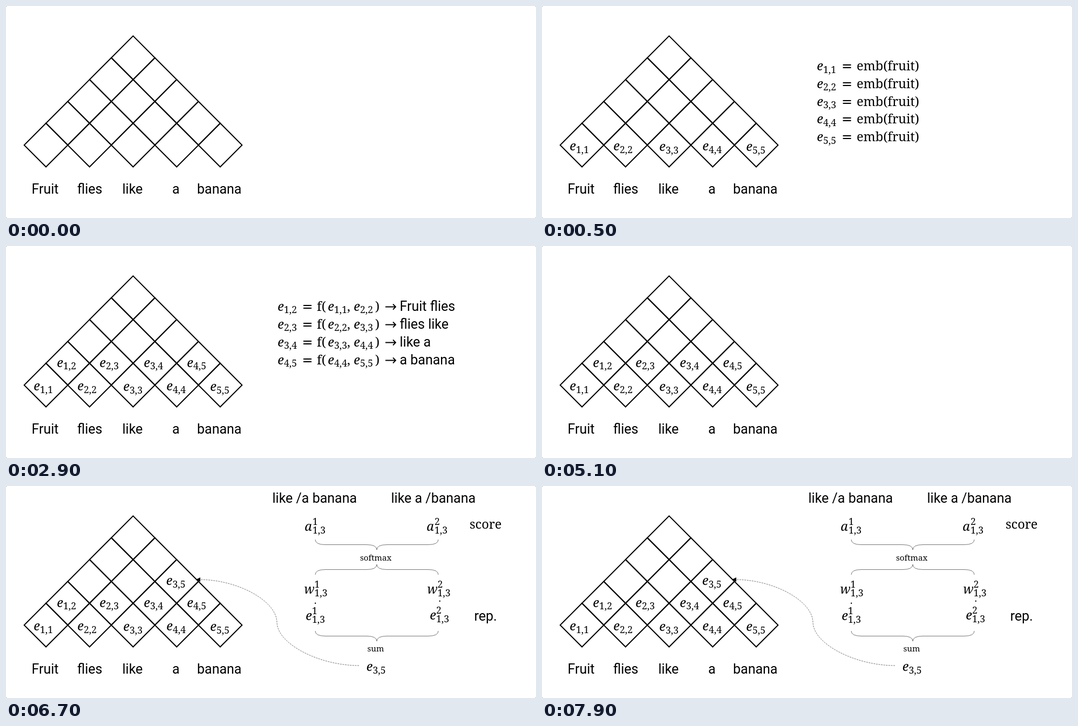
Animation, 982 px wide and 392 px high, one loop 8 s. Source, as an HTML page:

```html
<!DOCTYPE html>
<html lang="en">
<head>
<meta charset="utf-8">
<title>Chart parsing</title>
<style>
  html, body { margin: 0; width: 100%; height: 100%; overflow: hidden; background: #888; }
  svg { display: block; width: 982px; height: 392px; background: #fff; border-radius: 2px; }
  .sans { font: 400 25px Roboto, sans-serif; }
  .math { font: 500 23.5px "Noto Serif", serif; }
  .var { font: italic 500 23.5px "Noto Serif", serif; }
  .idx { font: 500 17.5px "Noto Serif", serif; }
  .note { font: 500 15.2px "Noto Serif", serif; }
  .eq { font: 24px "DejaVu Sans", sans-serif; }
  text { white-space: pre; }
  path { fill: none; stroke: #000; }
  .cell { stroke-width: 2; }
  .arrow { stroke-width: 1.8; }
  .thin { stroke: #777; stroke-width: 1; }
  .dash { stroke: #777; stroke-width: 1; stroke-dasharray: 3 1.6; }
  .head { fill: #000; stroke: none; }
</style>
</head>
<body>
<svg id="stage" viewBox="0 0 982 392"></svg>
<script>
const NS = 'http://www.w3.org/2000/svg';
const LOOP = 8000;
const stage = document.getElementById('stage');
const layers = [];

function add(parent, tag, attrs, content = '') {
  const el = document.createElementNS(NS, tag);
  for (const key in attrs) el.setAttribute(key, attrs[key]);
  el.textContent = content;
  return parent.appendChild(el);
}

// A group that is visible from `start` until `end` (ms).
function layer(start, end = LOOP) {
  const g = add(stage, 'g', {});
  layers.push({ g, start, end });
  return g;
}

const text = (g, cls, x, y, s) => add(g, 'text', { class: cls, x, y }, s);
const path = (g, cls, d) => add(g, 'path', { class: cls, d });

const SUB_SHIFT = { e: 11, a: 14, w: 18.5 };
function sym(g, x, y, base, sub, sup) {
  const ix = x + SUB_SHIFT[base];
  text(g, 'var', x - 0.7, y, base);
  text(g, 'idx', ix, y + (sup ? 5.5 : 4.5), sub);
  if (sup) text(g, 'idx', ix, y - 10.5, sup);
}

function brace(g, y, dir) {
  const mid = y + 9.5 * dir, tip = y + 19 * dir;
  path(g, 'thin', `M573 ${y}Q573 ${mid} 592 ${mid}H668Q687 ${mid} 687 ${tip}` +
    `Q687 ${mid} 706 ${mid}H782Q801 ${mid} 801 ${y}`);
}

// Pyramid and sentence
const base = layer(0);
const H = 40.36;
for (let row = 0; row < 5; row++) {
  for (let col = 0; col <= row; col++) {
    const x = 235.5 + (2 * col - row) * H, y = 95.7 + row * H;
    path(base, 'cell', `M${x} ${y - H}L${x + H} ${y}L${x} ${y + H}L${x - H} ${y}Z`);
  }
}
[[47.5, 'Fruit'], [132, 'flies'], [215.5, 'like'], [308, 'a'], [354, 'banana']]
  .forEach(([x, word]) => text(base, 'sans', x, 347, word));

// Single-word cells and their embeddings
const words = layer(500);
[52, 133, 218, 298, 379].forEach((x, i) =>
  sym(words, x, i % 2 || !i ? 267 : 268, 'e', `${i + 1},${i + 1}`));

const embeds = layer(500, 1700);
for (let i = 1; i <= 5; i++) {
  const y = 119 + (i - 1) * 32.8;
  sym(embeds, 510, y, 'e', `${i},${i}`);
  text(embeds, 'eq', 555, y, '=');
  text(embeds, 'math', 583, y, 'emb(fruit)');
}

// Two-word cells and their composition
const pairs = layer(2900);
[95, 174, 256, 336].forEach((x, i) => sym(pairs, x, 223.5, 'e', `${i + 1},${i + 2}`));

const compose = layer(2900, 5100);
['Fruit flies', 'flies like', 'like a', 'a banana'].forEach((phrase, i) => {
  const y = 119.5 + i * 33, a = i + 1, b = i + 2;
  sym(compose, 504, y, 'e', `${a},${b}`);
  text(compose, 'eq', 548.5, y, '=');
  text(compose, 'math', 576, y, 'f(');
  sym(compose, 597, y, 'e', `${a},${a}`);
  text(compose, 'math', 632, y, ',');
  sym(compose, 645, y, 'e', `${b},${b}`);
  text(compose, 'math', 684, y, ')');
  path(compose, 'arrow', `M703 ${y - 7}h19m-5 -5l5 5l-5 5`);
  text(compose, 'sans', 729.5, y + .5, phrase);
});

// Weighted sum for the three-word cell
const sum = layer(6200);
text(sum, 'sans', 493.5, 31, 'like /a banana');
text(sum, 'sans', 713.5, 31, 'like a /banana');
[['a', 554, 780, 82.5], ['w', 553, 781, 198.5], ['e', 556, 786, 247.5]].forEach(([s, x1, x2, y]) => {
  sym(sum, x1, y, s, '1,3', '1');
  sym(sum, x2, y - (s === 'e' ? 1 : 0), s, '1,3', '2');
});
text(sum, 'idx', 571, 218, '.');
text(sum, 'idx', 801.5, 214, '.');
text(sum, 'math', 859, 79, 'score');
text(sum, 'sans', 867.5, 249, 'rep.');
text(sum, 'note', 656, 138, 'softmax');
text(sum, 'note', 669.5, 306, 'sum');
brace(sum, 99, 1);
brace(sum, 164, -1);
brace(sum, 268, 1);
sym(sum, 668.5, 342, 'e', '3,5');
sym(sum, 297.5, 183, 'e', '3,5');
path(sum, 'dash', 'M654 332C580 332 503 292 502 252.5C502 213 430 173 358 173');
path(sum, 'head', 'M352 173L360 169V177Z');

const origin = performance.now();
function draw() {
  const t = (performance.now() - origin) % LOOP;
  for (const { g, start, end } of layers) {
    g.setAttribute('visibility', t >= start && t < end ? 'visible' : 'hidden');
  }
  requestAnimationFrame(draw);
}
draw();
</script>
</body>
</html>
```
